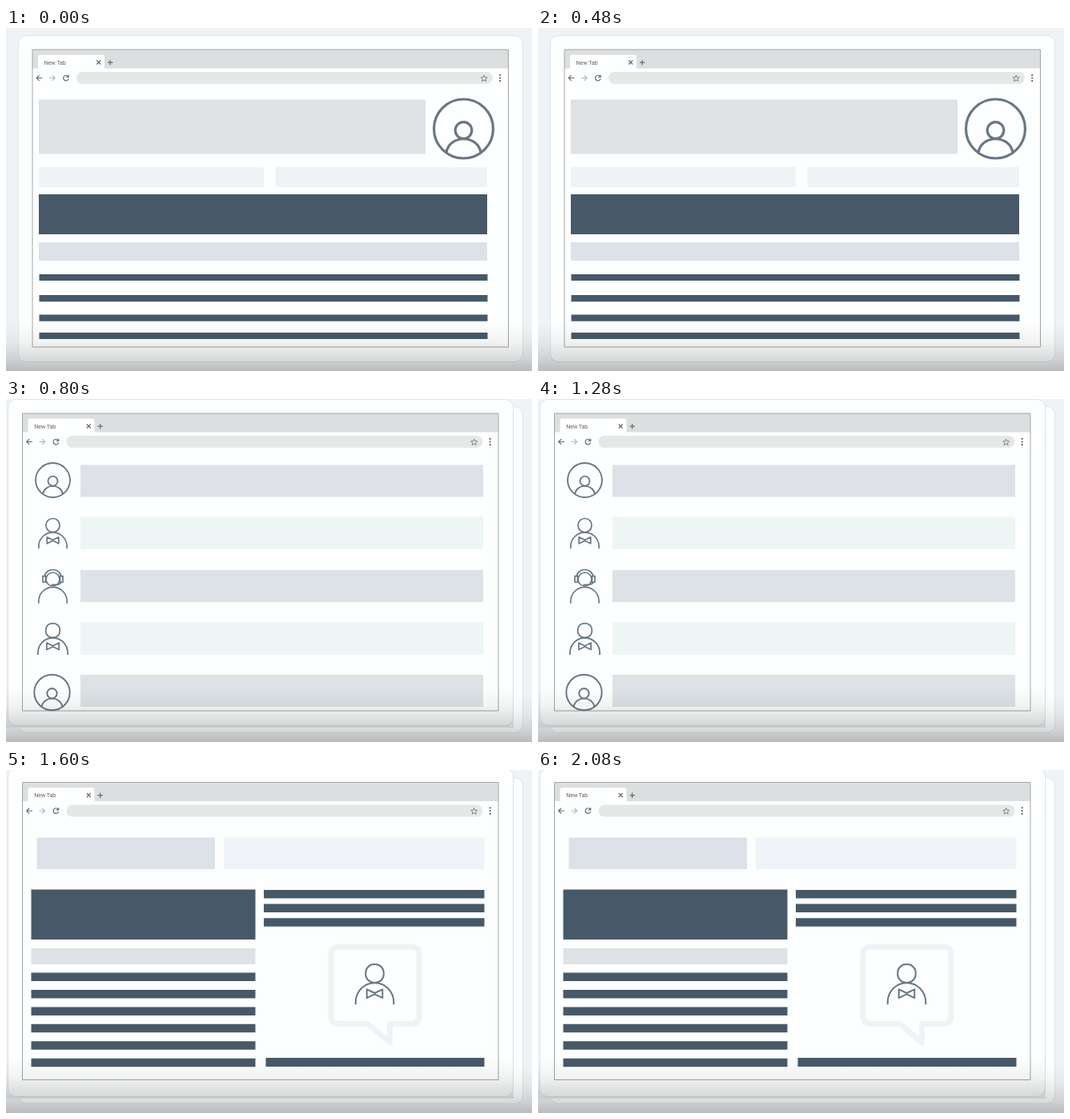
An HTML page for the animation above (2.4 s loop, 657 px wide and 429 px high).

```html
<!DOCTYPE html>
<html lang="en">
<head>
<meta charset="utf-8">
<title>Page layouts</title>
<style>
  html, body { margin: 0; width: 100%; height: 100%; overflow: hidden; background: #f0f3f6; }
  svg { display: block; width: 657px; height: 429px; }
  text { font: 7px Roboto, Arial, sans-serif; fill: #5c5f62; }
  .line { fill: none; stroke: #687784; }
  .bar { fill: #475968; }
  .list, .article { visibility: hidden; animation: list 2400ms step-end infinite; }
  .article { animation-name: article; }
  @keyframes list {
    0% { visibility: hidden; }
    33.3333% { visibility: visible; }
    66.6667%, 100% { visibility: hidden; }
  }
  @keyframes article {
    0% { visibility: hidden; }
    66.6667%, 100% { visibility: visible; }
  }
</style>
</head>
<body>
<svg viewBox="0 0 657 429">
  <defs>
    <linearGradient id="shade" gradientUnits="userSpaceOnUse" x1="0" y1="368" x2="0" y2="429">
      <stop offset="0" stop-color="#000" stop-opacity="0"/>
      <stop offset=".4" stop-color="#000" stop-opacity=".045"/>
      <stop offset=".78" stop-color="#000" stop-opacity=".145"/>
      <stop offset="1" stop-color="#000" stop-opacity=".23"/>
    </linearGradient>
    <clipPath id="layer"><path d="M0 0H634V411H0z"/></clipPath>

    <g id="browser">
      <path d="M33 27H627.5V399H33z" fill="#fdfefe"/>
      <path d="M33 27H627.5V50.5H33z" fill="#dddedf"/>
      <path d="M40 51V36.500q0-3 3-3H120q3 0 3 3V51z" fill="#fdfefe"/>
      <text x="47.700" y="45.500">New Tab</text>
      <g fill="none" stroke="#66696c" stroke-width="1.200">
        <path d="M113.300 40.500l5 5m0-5l-5 5M130.200 40v6.400M127 43.200h6.400"/>
        <path d="M45.300 62.500H38.300m3.300-3.400l-3.400 3.400l3.400 3.400"/>
        <path d="M54 62.500h7m-3.300-3.400l3.400 3.400l-3.400 3.400" stroke="#b3b6b8"/>
        <path d="M77.300 60.200a3.300 3.300 0 1 0 .9 3.100M78.200 58.800v2.600h-2.800"/>
      </g>
      <rect x="88" y="55" width="520" height="15" rx="7.500" fill="#e6e7e8"/>
      <path d="M597.200 59l1.100 2.700 2.900.2-2.200 1.900.7 2.800-2.500-1.500-2.500 1.500.7-2.800-2.200-1.900 2.900-.2z" fill="none" stroke="#74777a" stroke-width=".900"/>
      <g fill="#55585b">
        <circle cx="617.200" cy="58.800" r="1.100"/>
        <circle cx="617.200" cy="62.500" r="1.100"/>
        <circle cx="617.200" cy="66.200" r="1.100"/>
      </g>
      <path d="M33 27H627.500V399H33z" fill="none" stroke="#a2a5a7"/>
    </g>

    <g id="avatar" class="line" stroke-width="3.200">
      <circle r="37"/>
      <circle cy="2" r="10.300"/>
      <path d="M-21.500 30C-18 7 18 7 21.500 30"/>
    </g>
    <path id="body" class="line" d="M-17.700 29V26.500a17.700 17.700 0 0 1 35.400 0V29"/>
    <g id="waiter" class="line">
      <rect x="-8.400" y="-8.500" width="16.800" height="17" rx="7.800"/>
      <use href="#body"/>
      <path d="M-7.300 14.800L0 18.300L7.300 14.800V22.800L0 19.300L-7.300 22.800z" stroke-linejoin="round"/>
    </g>
    <g id="agent" class="line">
      <circle r="8.500"/>
      <path d="M-10.500-3C-9-15 9-15 10.500-3M-9-4h-3.500v7.500H-9zM9-4h3.500v7.500H9zM10.500 3.500Q10 6.800 2 6.800M-2 6.800h5"/>
      <use href="#body" y="1"/>
    </g>
  </defs>

  <rect width="657" height="429" fill="#f0f3f6"/>
  <rect x="15.500" y="9.500" width="630" height="408" rx="10" fill="#fdfefe" stroke="#dce4e7"/>
  <use href="#browser"/>
  <path d="M41 89.500H524V157.500H41z" fill="#dfe1e4"/>
  <path d="M41 174H322V199H41zM336.500 174H601V199H336.500z" fill="#f0f3f6"/>
  <path d="M41 268H601V291H41z" fill="#dde2e9"/>
  <path class="bar" d="M41 208H601V258H41zM41.500 308h560v8h-560zM41.500 334h560v8.300h-560zM41.500 358.500h560v8.300h-560zM41.500 381h560v8h-560z"/>
  <use href="#avatar" x="571.500" y="126"/>
  <rect y="368" width="657" height="61" fill="url(#shade)"/>

  <g class="list" clip-path="url(#layer)">
    <rect width="634" height="411" fill="#f0f3f6"/>
    <rect x="2.500" y=".500" width="631" height="408" rx="10" fill="#fdfefe" stroke="#dce4e7"/>
    <use href="#browser" x="-12.500" y="-9"/>
    <path d="M93 82.500H596V122.500H93z" fill="#dee1e8"/>
    <path d="M93 147.500H596V187.500H93zM93 279.500H596V320H93z" fill="#edf5f5"/>
    <path d="M93 214H596V254H93zM93 345H596V385H93z" fill="#dce2e5"/>
    <use href="#avatar" transform="translate(58.500 101.500) scale(.58)"/>
    <g stroke-width="1.700">
      <use href="#waiter" x="58.500" y="158"/>
      <use href="#agent" x="58.500" y="225.500"/>
      <use href="#waiter" transform="translate(58.500 289.500) scale(1.050)"/>
    </g>
    <use href="#avatar" transform="translate(57.500 367) scale(.6)"/>
    <rect y="368" width="657" height="61" fill="url(#shade)" transform="translate(0 -9)"/>
  </g>

  <g class="article" clip-path="url(#layer)">
    <rect width="634" height="411" fill="#f0f3f6"/>
    <rect x="2.500" y="-2" width="631" height="410.500" rx="10" fill="#fdfefe" stroke="#dce4e7"/>
    <use href="#browser" x="-12.500" y="-11.500"/>
    <path d="M38.500 84.500H261V124H38.500z" fill="#dde1e8"/>
    <path d="M272 84.500H597.500V124H272z" fill="#f0f3f7"/>
    <path d="M31.500 223H311.500V243H31.500z" fill="#dee1e5"/>
    <path class="bar" d="M31.500 149.500H311.500V212H31.500zM31.500 253.500h280v10.500h-280zM31.500 275h280v10.500h-280zM31.500 296.500h280v10.500h-280zM31.500 317.700h280v10.500h-280zM31.500 339.300h280v10.500h-280zM31.500 360.700h280v10.500h-280z"/>
    <path class="bar" d="M322 150H597.500V160.500H322zM322 167.500H597.500V178H322zM322 185.300H597.500V195.800H322zM324.500 360H597.500V371H324.500z"/>
    <path d="M416 221H506q10 0 10 10V307.500q0 10-10 10H479.500V341L452 317.500H416q-10 0-10-10V231q0-10 10-10z" fill="none" stroke="#f0f2f6" stroke-width="7" stroke-linejoin="round"/>
    <use href="#waiter" transform="translate(460.500 254.500) scale(1.340)" stroke-width="1.500"/>
    <rect y="368" width="657" height="61" fill="url(#shade)" transform="translate(0 -9)"/>
  </g>
</svg>
</body>
</html>
```
